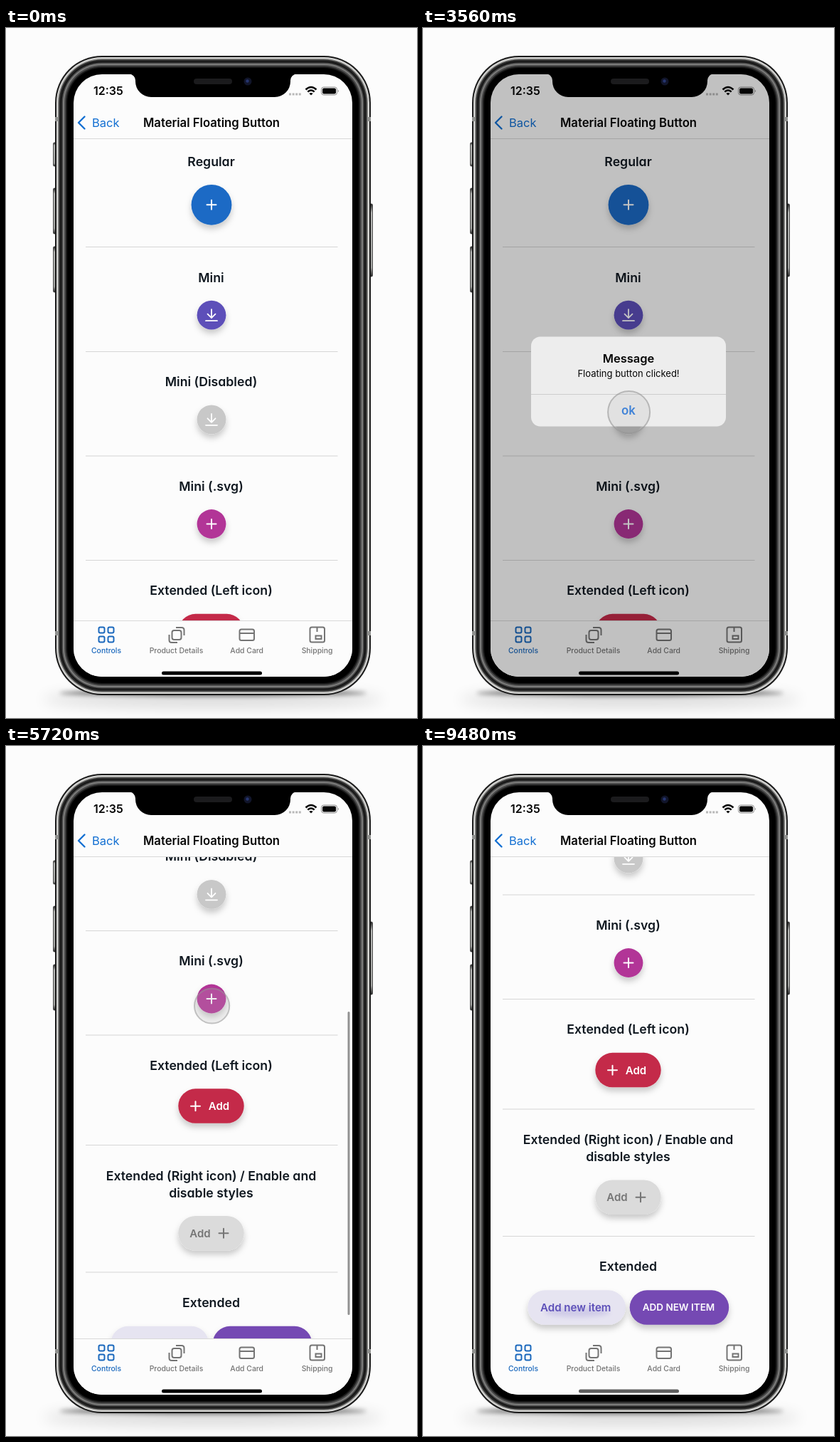
An HTML page for the animation above (10000 ms loop, 578 by 969 pixels).

```html
<!DOCTYPE html>
<html lang="en">
<head>
<meta charset="utf-8">
<title>Material Floating Button</title>
<style>
html, body { margin: 0; width: 100%; height: 100%; overflow: hidden; background: #fcfcfc; }
svg { display: block; width: 100%; height: 100%; font-family: Inter, Roboto, sans-serif; }
.mid { text-anchor: middle; }
.heading { font-size: 17.7px; font-weight: 600; fill: #101820; font-feature-settings: "cv11"; }
.label { font-weight: 600; font-feature-settings: "cv11"; }
.line { fill: none; stroke-linecap: round; stroke-linejoin: round; }
.tab { fill: none; stroke: #747474; stroke-width: 2; }
.tab text { font-size: 10.4px; font-weight: 500; fill: #747474; stroke: none; text-anchor: middle; }
.tab.on { stroke: #1a68bd; }
.tab.on text { fill: #1a68bd; }
</style>
</head>
<body>
<svg viewBox="0 0 578 969" preserveAspectRatio="none">
  <defs>
    <clipPath id="screenClip"><rect x="95" y="65" width="392" height="846" rx="40"/></clipPath>
    <clipPath id="listClip"><rect x="95" y="155" width="392" height="756"/></clipPath>
    <filter id="lift" x="-30%" y="-30%" width="160%" height="180%">
      <feDropShadow dx="0" dy="5.500" stdDeviation="4" flood-color="#000" flood-opacity=".2"/>
    </filter>
    <filter id="soft" x="-20%" y="-150%" width="140%" height="400%"><feGaussianBlur stdDeviation="10"/></filter>
    <filter id="tight" x="-20%" y="-150%" width="140%" height="400%"><feGaussianBlur stdDeviation="3"/></filter>
    <linearGradient id="key" x2="0" y2="1">
      <stop offset="0" stop-color="#222"/><stop offset=".12" stop-color="#b5b6b4"/>
      <stop offset=".88" stop-color="#a2a3a1"/><stop offset="1" stop-color="#222"/>
    </linearGradient>
  </defs>

  <rect width="578" height="969" fill="#fcfcfc"/>
  <ellipse cx="291" cy="943" rx="240" ry="12" fill="#000" opacity=".13" filter="url(#soft)"/>
  <ellipse cx="291" cy="934" rx="216" ry="4" fill="#000" opacity=".6" filter="url(#tight)"/>

  <g id="body"></g>

  <g clip-path="url(#screenClip)">
    <rect x="95" y="65" width="392" height="846" fill="#fcfcfc"/>
    <g clip-path="url(#listClip)"><g id="list"></g></g>

    <path d="M95 155.5H487" stroke="#d9d9d9"/>
    <path class="line" d="M110.5 124.5L102 133L110.5 141.5" stroke="#1470d2" stroke-width="2.4"/>
    <text x="121" y="139" font-size="16.5" fill="#1470d2">Back</text>
    <text class="mid" x="289" y="139" font-size="16.7" font-weight="600" fill="#050505">Material Floating Button</text>
    <text x="123" y="94" font-size="16" font-weight="600" fill="#050505">12:35</text>
    <path d="M398 93H415" stroke="#b8b8b8" stroke-width="3" stroke-dasharray="3 1.6"/>
    <path d="M421.5 86.5Q429 79.5 436.5 86.5M424.3 89.6Q429 85.5 433.7 89.6" fill="none" stroke="#050505" stroke-width="2.5"/>
    <path d="M426.4 92Q429 89.8 431.6 92L429 94.6Z" fill="#050505"/>
    <rect x="443.5" y="83" width="22" height="11" rx="3.2" fill="none" stroke="#8c8c8c"/>
    <rect x="445" y="84.5" width="19" height="8" rx="2" fill="#050505"/>
    <path d="M467 86.5Q469 88.5 467 90.5Z" fill="#8c8c8c"/>

    <rect x="95" y="832" width="392" height="79" fill="#fcfcfc"/>
    <path id="tabLine" d="M95 832.5H487" stroke="#d9d9d9"/>
    <g class="tab on">
      <rect x="130.5" y="841.5" width="8" height="8" rx="2"/><rect x="143.5" y="841.5" width="8" height="8" rx="2"/>
      <rect x="130.5" y="854.5" width="8" height="8" rx="2"/><rect x="143.5" y="854.5" width="8" height="8" rx="2"/>
      <text x="141" y="878.3">Controls</text>
    </g>
    <g class="tab">
      <rect x="233.5" y="846" width="13" height="13" rx="3"/>
      <path d="M239 842H247Q250.5 842 250.5 845.5V853M229.5 852V859.5Q229.5 863 233 863H241"/>
      <text x="239.5" y="878.3">Product Details</text>
    </g>
    <g class="tab">
      <rect x="328.5" y="844.5" width="20.5" height="15.5" rx="2.5"/><path d="M328.5 850H349"/>
      <text x="338.7" y="878.3">Add Card</text>
    </g>
    <g class="tab">
      <rect x="427.5" y="841.5" width="20.5" height="21" rx="2.5"/><path d="M437.5 841.5V848"/>
      <rect x="435.5" y="853.5" width="8" height="4.5"/>
      <text x="437.5" y="878.3">Shipping</text>
    </g>
    <rect id="home" x="219" y="903.5" width="141" height="5" rx="2.5"/>
    <rect id="bar" x="480.5" width="3" rx="1.5" fill="#919191"/>

    <rect id="dim" x="95" y="65" width="392" height="846"/>
    <g id="alert">
      <rect id="panel" x="152" y="433.5" width="274" height="126" rx="13" fill="#ededed"/>
      <path d="M152 514.5H426" stroke="#cdcdcd"/>
      <g class="mid">
        <text x="289" y="470" font-size="16.5" font-weight="600" fill="#050505">Message</text>
        <text x="289" y="490.5" font-size="13" fill="#050505">Floating button clicked!</text>
        <text x="289" y="543.5" font-size="16.8" font-weight="600" fill="#1f74e0">ok</text>
      </g>
    </g>
    <circle id="touch" cx="289.6" fill="rgba(180,180,180,.22)" stroke="rgba(150,150,150,.6)" stroke-width="2"/>
  </g>

  <path d="M173 64.5a9 9 0 0 1 9 9v1.500a22 22 0 0 0 22 22H378a22 22 0 0 0 22 -22v-1.500a9 9 0 0 1 9 -9Z" fill="#000"/>
  <rect x="264" y="71" width="54" height="8" rx="4" fill="#1b1b1d"/>
  <circle cx="340" cy="75" r="5.5" fill="#11152a"/><circle cx="339.5" cy="74.5" r="2.2" fill="#26356f"/>
</svg>

<script>
const LOOP = 10000, STEP = 40, MAX_SCROLL = 392;
const $ = id => document.getElementById(id);
const set = (el, attrs) => { for (const k in attrs) el.setAttribute(k, attrs[k]); };
const clamp = (v, lo = 0, hi = 1) => Math.min(hi, Math.max(lo, v));

// Phone shell: side keys, nested rounded rims, antenna bands
const key = (x, y, h) => `<rect x="${x}" y="${y}" width="6" height="${h}" rx="1.5" fill="url(#key)" stroke="#333" stroke-width=".8"/>`;
const rim = ([inset, fill]) => `<rect x="${69 + inset}" y="${39 + inset}" width="${444 - 2 * inset}"
  height="${898 - 2 * inset}" rx="${66 - inset}" fill="${fill}"/>`;
const band = (x, y) => `<rect x="${x}" y="${y}" width="5" height="6" fill="#8f908e"/>`;
$('body').innerHTML =
  key(66.5, 161, 33) + key(66.5, 225, 64) + key(66.5, 307, 64) + key(509.5, 247, 102) +
  [[0, '#1a1a1a'], [2, '#d6d6d4'], [4, '#8a8a88'], [5.5, '#2a2a2a'], [7.5, '#161616'],
   [9.5, '#484848'], [11, '#7c7c7b'], [13, '#4a4a4a'], [15, '#1c1c1c'], [17, '#000']].map(rim).join('') +
  [125, 847].map(y => band(69, y) + band(508, y)).join('');

// Scrolling list
const heading = (y, text) => `<text class="mid heading" x="288.5" y="${y + 5.8}">${text}</text>`;
const divider = y => `<path d="M112 ${y}H466.5" stroke="#d6d6d6" stroke-width="1.2"/>`;
const plus = (x, y, r = 6.5, color = '#fff') =>
  `<path class="line" d="M${x - r} ${y}h${2 * r}M${x} ${y - r}v${2 * r}" stroke="${color}" stroke-width="2"/>`;
const download = y => `<path class="line" stroke="#fff" stroke-width="1.8"
  d="M289 ${y - 8}v12M283.5 ${y - 1.5}l5.5 5.5l5.5 -5.5M281 ${y + 8}h16"/>`;
const round = (y, r, fill, icon) => `<circle cx="289" cy="${y}" r="${r}" fill="${fill}" filter="url(#lift)"/>${icon}`;
const pill = (x, y, w, fill) => `<rect x="${x}" y="${y}" width="${w}" height="48.5" rx="24.25" fill="${fill}" filter="url(#lift)"/>`;
const label = (x, y, size, fill, text) =>
  `<text class="mid label" x="${x}" y="${y}" font-size="${size}" fill="${fill}">${text}</text>`;

$('list').innerHTML = [
  heading(188, 'Regular'), round(248.3, 28.4, '#1b6ac5', plus(289, 248.3)),
  heading(351, 'Mini'), round(403.2, 20.4, '#5d50b9', download(403.2)),
  heading(497, 'Mini (Disabled)'), round(549.8, 20.4, '#c8c8c8', download(549.8)),
  heading(644, 'Mini (.svg)'), round(696.5, 20.4, '#b23497', plus(289, 696.5)),
  heading(790.5, 'Extended (Left icon)'), pill(242.3, 822.8, 92.4, '#c42c49'),
  plus(266.5, 847.2), label(299.5, 852.6, 15, '#fff', 'Add'),
  heading(945.5, 'Extended (Right icon) / Enable and'), heading(969.5, 'disable styles'),
  pill(242.3, 1001.5, 92.4, '#dbdbdb'), plus(306, 1025.8, 6.5, '#757575'), label(273, 1031.2, 15, '#757575', 'Add'),
  heading(1123.5, 'Extended'),
  pill(147.3, 1156.3, 137.7, '#e6e4f1'),
  '<ellipse cx="217" cy="1187" rx="46" ry="7" fill="#5d50b9" opacity=".16" filter="url(#tight)"/>',
  label(214.7, 1185.5, 15.1, '#5d50b9', 'Add new item'),
  pill(290.7, 1156.3, 139.5, '#7549b3'), label(359.5, 1185.3, 13.5, '#fff', 'ADD NEW ITEM'),
  ...[307.5, 454.5, 601, 747.5, 902, 1080.5].map(divider)
].join('');

// Scroll path as [time, offset, velocity]: drag, glide past the end, spring back
const SCROLL = [[5040, 0, 0], [5720, 341.5, .36], [6280, 415, 0], [6940, MAX_SCROLL, 0]];
function scrollAt(t) {
  if (t <= SCROLL[0][0]) return 0;
  for (let i = 1; i < SCROLL.length; i++) {
    const [t0, a, va] = SCROLL[i - 1], [t1, b, vb] = SCROLL[i];
    if (t > t1) continue;
    const d = t1 - t0, u = (t - t0) / d, w = 1 - u;
    return w * w * (1 + 2 * u) * a + u * u * (1 + 2 * w) * b + d * u * w * (w * va - u * vb);
  }
  return MAX_SCROLL;
}

// Critically damped spring from 0 to 1; rate is per millisecond
const spring = (elapsed, rate) => elapsed <= 0 ? 0 : 1 - (1 + rate * elapsed) * Math.exp(-rate * elapsed);

const TOUCHES = [
  { down: 1600, up: 2340, y: 248.3 },
  { down: 3200, up: 3580, y: 539.5 },
  { down: 4960, up: 5690, y: 725.5 }
];
const RELEASE = 180;

function draw(t) {
  const scroll = scrollAt(t);
  set($('list'), { transform: `translate(0 ${-scroll})` });

  const barTop = 164 + .612 * scroll;
  set($('bar'), {
    y: barTop, height: Math.max(0, Math.min(426, 830 - barTop)),
    opacity: t < 5080 ? 0 : clamp((7960 - t) / 120)
  });
  const atEnd = clamp((scroll - 370) / 22);
  set($('tabLine'), { opacity: 1 - atEnd });
  const gray = Math.round(95 * atEnd);
  set($('home'), { fill: `rgb(${gray},${gray},${gray})` });

  const shown = spring(t - 2160, .0105), hidden = spring(t - 3580, .012);
  const visible = t < 4300 ? shown * (1 - hidden) : 0;
  const scale = 1.2 - .2 * shown;
  set($('dim'), { opacity: .236 * visible });
  set($('panel'), { opacity: visible });
  set($('alert'), {
    opacity: visible,
    transform: `translate(289 496.5) scale(${scale}) translate(-289 -496.5)`
  });

  const touch = TOUCHES.find(p => t >= p.down && t < p.up + RELEASE);
  const size = touch ? 1 - clamp((t - touch.up) / RELEASE) : 0;
  set($('touch'), {
    cy: touch ? touch.y - Math.min(scroll, 341.5) * 1.0556 : 0,
    r: 29.5 * size, opacity: Math.sqrt(size)
  });
}

const start = performance.now();
function tick() {
  const t = (performance.now() - start) % LOOP;
  draw(Math.floor(t / STEP) * STEP);
  requestAnimationFrame(tick);
}
tick();
</script>
</body>
</html>
```
